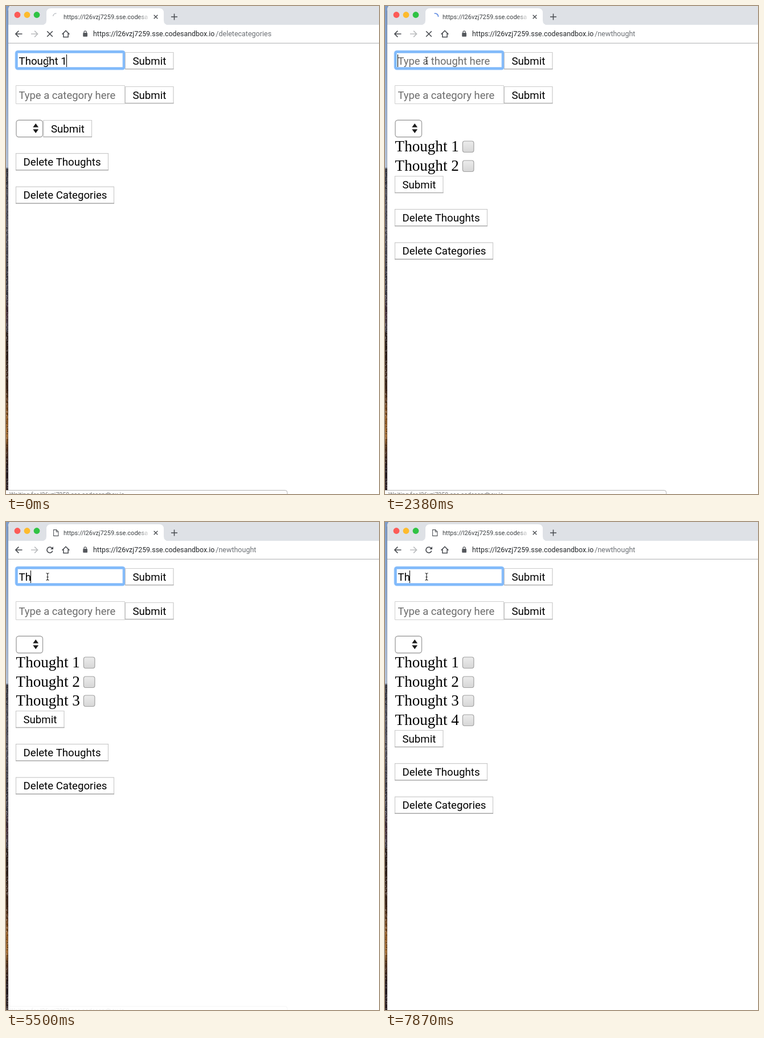
An HTML page with a canvas that plays this animation: 655x856 px, repeating every 8 s.

```html
<!DOCTYPE html>
<html lang="en">
<head>
<meta charset="utf-8">
<title>Thoughts form</title>
<style>
html, body { margin: 0; width: 100%; height: 100%; overflow: hidden; background: #fff; }
canvas { display: block; width: 655px; height: 856px; }
</style>
</head>
<body>
<canvas id="stage" width="655" height="856"></canvas>
<script>
const ctx = document.getElementById('stage').getContext('2d');
const LOOP = 8000, STEPS = 54, ROW = 33.6;
const UI = 'Roboto, "Open Sans", sans-serif';
const SERIF = '"Liberation Serif", "Noto Serif", serif';
const HOST = 'l26vzj7259.sse.codesandbox.io';
const INK = '#484b50', HINT = '#6c6c6c';

// Each round: request sent, page swapped, load done, first key, status bar fading, letters typed per step
const SLOW = [1, 2, 3, 4, 6, 7, 8, 9], FAST = [1, 2, 3, 5, 7, 8, 9];
const rounds = [
  { send: -1, swap: 1, done: 4, type: 5, fade: 6, keys: SLOW },
  { send: 14, swap: 16, done: 21, type: 22, fade: 22, keys: FAST },
  { send: 30, swap: 32, done: 35, type: 36, fade: 37, keys: FAST },
  { send: 44, swap: 47, done: 51, type: 52, fade: 52, keys: FAST }
];

function stateAt(k) {
  const count = rounds.filter(r => r.swap <= k).length;
  const last = rounds[count - 1];
  const full = 'Thought ' + (count + 1);
  let text = full;
  if (last) {
    const i = Math.min(k - last.type, last.keys.length - 1);
    text = i < 0 ? '' : full.slice(0, last.keys[i]);
  }
  return {
    k, count, text,
    loading: rounds.find(r => k >= r.send && k < r.done),
    bar: rounds.some(r => k >= r.send && k < r.fade) ? 1 : rounds.some(r => k === r.fade) ? 0.12 : 0
  };
}

function rect(x, y, w, h, color) {
  ctx.fillStyle = color;
  ctx.fillRect(x, y, w, h);
}

function box(x, y, w, h, r, fill, stroke, width = 1) {
  ctx.beginPath();
  ctx.roundRect(x, y, w, h, r);
  if (fill) { ctx.fillStyle = fill; ctx.fill(); }
  if (stroke) { ctx.strokeStyle = stroke; ctx.lineWidth = width; ctx.stroke(); }
}

function path(d, color, width, fill) {
  const p = new Path2D(d);
  if (fill) { ctx.fillStyle = fill; ctx.fill(p); }
  if (color) { ctx.strokeStyle = color; ctx.lineWidth = width; ctx.stroke(p); }
}

function disc(x, y, r, color) {
  ctx.fillStyle = color;
  ctx.beginPath();
  ctx.arc(x, y, r, 0, Math.PI * 2);
  ctx.fill();
}

function label(text, x, y, size, color = '#000', family = UI) {
  ctx.font = `${size}px ${family}`;
  ctx.fillStyle = color;
  ctx.fillText(text, x, y);
  return ctx.measureText(text).width;
}

function fade(x0, y0, x1, y1, stops) {
  const g = ctx.createLinearGradient(x0, y0, x1, y1);
  stops.forEach(([at, color]) => g.addColorStop(at, color));
  return g;
}

function desktop() {
  rect(0, 0, 6, 856, fade(0, 0, 0, 856, [
    [0, '#7f9dc9'], [0.12, '#8ba7d0'], [0.25, '#a6b9d6'], [0.33, '#b6c3d7'],
    [0.335, '#34353f'], [0.42, '#5c5c68'], [0.52, '#4b4a54'], [0.59, '#41404a'],
    [0.63, '#47303a'], [0.665, '#57545e'], [0.67, '#2c221f'], [0.79, '#4a3021'],
    [0.84, '#95602c'], [0.88, '#a56e32'], [0.91, '#543624'], [0.95, '#261d22'], [1, '#35282a']
  ]));
  // rocky grain below the sky
  let seed = 7;
  const rnd = () => (seed = seed * 16807 % 2147483647) / 2147483647;
  for (let y = 286; y < 856; y += 1 + Math.floor(rnd() * 4)) {
    const tone = rnd() < 0.55 ? '0,0,0' : '190,185,190';
    rect(Math.floor(rnd() * 3), y, 2, 2, `rgba(${tone},${0.1 + rnd() * 0.3})`);
  }
  rect(3, 8, 1, 848, 'rgba(0,0,0,.16)');
}

function spinner(s) {
  const rad = Math.PI / 180, r = s.loading;
  let from, to;
  const waiting = s.k < r.swap;
  if (waiting) {
    to = -85 - (s.k - r.send - 1) * 35;
    from = to - 85;
  } else {
    const n = s.k - r.swap;
    from = -105 + n * 27;
    to = from + Math.min(270, 110 + n * 60);
  }
  ctx.beginPath();
  ctx.arc(88, 18.5, 5.5, from * rad, to * rad);
  ctx.strokeStyle = waiting ? '#a3a8af' : '#5f8ae2';
  ctx.lineWidth = waiting ? 1.2 : 1.6;
  ctx.stroke();
}

function browser(s) {
  box(4, 0, 660, 60, [5, 0, 0, 0], '#dee1e6');
  rect(4, 33, 651, 823, '#fff');
  disc(20, 15.5, 5.4, '#fc5b57');
  disc(37, 15.5, 5.4, '#fdbb2d');
  disc(54, 15.5, 5.4, '#2fc344');

  path('M62 33.5Q71 33.5 71 25V12Q71 4 79 4H269Q277 4 277 12V25Q277 33.5 286 33.5Z', null, 0, '#fff');
  if (s.loading) spinner(s);
  else path('M83.6 13.6H88.5L91.9 17V24.4H83.6ZM88.3 13.8V17.2H91.8', '#55585d', 1.1);
  label('https://' + HOST.slice(0, 21), 101, 22.5, 11.05, fade(101, 0, 251, 0, [
    [0, '#3c4043'], [0.87, '#3c4043'], [1, 'rgba(60,64,67,.1)']
  ]));
  path('M259.7 15.7L266.3 22.3M266.3 15.7L259.7 22.3', '#4c4f54', 1.4);
  path('M290 19H301M295.5 13.5V24.5', INK, 1.5);

  if (s.k === 5) box(124, 37, 60, 24, [12, 0, 0, 12], fade(124, 0, 184, 0, [[0, '#eff1f2'], [1, '#f3f4f5']]));
  path('M28.5 49H17M22.3 43.6L16.9 49L22.3 54.4', INK, 1.6);
  path('M44 49H55.5M50.2 43.6L55.6 49L50.2 54.4', '#babcbe', 1.6);
  if (s.loading) {
    path('M72.2 44.2L81.8 53.8M81.8 44.2L72.2 53.8', INK, 1.6);
  } else {
    ctx.beginPath();
    ctx.arc(77, 49, 5, 0.3, 5.5);
    ctx.strokeStyle = INK;
    ctx.lineWidth = 1.6;
    ctx.stroke();
    path('M83 43V48H78Z', null, 0, INK);
  }
  path('M98.6 49.6L105 43.2L111.4 49.6M100.9 48V54.6H109.1V48', INK, 1.5);
  box(135.2, 47, 7.8, 6.8, 1, '#55585d');
  path('M136.9 47.5V46.2A2.2 2.3 0 0 1 141.3 46.2V47.5', '#55585d', 1.2);
  label('https://' + HOST, 153, 53, 12.4, '#25282b');
  label(s.count ? '/newthought' : '/deletecategories', 368.3, 53, 12.5, '#6b6f74');
  rect(4, 64.6, 651, 1.4, '#c2c4c6');
}

function button(text, x, y, w) {
  box(x, y, w, 29, 0, '#fff', '#cbcbcb', 1.2);
  rect(x - 0.5, y + 28.3, w + 1, 1.5, '#aeaeae');
  label(text, x + 13, y + 21, 18.67);
}

function thoughtInput(text) {
  box(15.5, 77.5, 194.5, 35, 5.5, '#c3dffe');
  box(16.3, 78.3, 192.9, 33.4, 4.5, '#80b9fa');
  box(20, 82, 185.5, 26, 1, '#a3cdfc');
  rect(21, 83, 183.5, 24, '#fff');
  const w = text ? label(text, 22.5, 102.5, 18.67) : 0;
  if (!text) label('Type a thought here', 22.5, 102.5, 18.4, HINT);
  rect(Math.round(22 + w), 85, 1, 22, '#000');
}

function checkbox(x, y) {
  box(x, y, 19.5, 19.5, 3.5, fade(0, y, 0, y + 20, [[0, '#ececec'], [1, '#d6d6d6']]), '#a2a2a2', 1.2);
}

function page(s) {
  thoughtInput(s.text);
  button('Submit', 209.5, 81.5, 84.5);

  box(17.5, 139.5, 191, 32, 0, '#fff', '#cfcfcf');
  label('Type a category here', 22.5, 162.5, 18.4, HINT);
  button('Submit', 209.5, 141.5, 84.5);

  box(18, 200.3, 46.5, 29.4, 4.5, '#fff', '#a3a3a3', 1.4);
  path('M47.3 212.7L52.2 206L57.1 212.7ZM47.3 216.3L52.2 223L57.1 216.3Z', null, 0, '#1c1c1c');

  for (let i = 0; i < s.count; i++) {
    label('Thought ' + (i + 1), 17.6, 255 + i * ROW, 27.1, '#000', SERIF);
    checkbox(136.4, 237 + Math.round(i * ROW));
  }
  const drop = s.count ? Math.round(s.count * ROW + 30.6) : 0;
  if (s.count) button('Submit', 17.5, 200.5 + drop, 84.5);
  else button('Submit', 66, 200.5, 84.5);
  button('Delete Thoughts', 17.5, 258.7 + drop, 162);
  button('Delete Categories', 17.5, 317.2 + drop, 172);
}

function pointer() {
  const beam = 'M70.4 89.7Q73 89.7 73 91.6Q73 89.7 75.6 89.7M73 91V101M70.4 102Q73 102 73 100.2Q73 102 75.6 102M71.5 96.5H74.5';
  path(beam, 'rgba(255,255,255,.7)', 2.6);
  path(beam, '#222', 1.1);
}

function statusBar(alpha) {
  if (!alpha) return;
  ctx.globalAlpha = alpha;
  box(-6, 849.5, 500, 20, 4, '#fdfdfd', '#b4b4b4');
  label(`Waiting for ${HOST}...`, 6, 860.5, 10.6, '#777');
  ctx.globalAlpha = 1;
}

function draw(now) {
  const k = Math.floor((now % LOOP) / LOOP * STEPS + 0.06) % STEPS;
  const s = stateAt(k);
  ctx.clearRect(0, 0, 655, 856);
  desktop();
  browser(s);
  page(s);
  pointer();
  statusBar(s.bar);
}

const start = performance.now();
function tick() {
  draw(performance.now() - start);
  requestAnimationFrame(tick);
}
tick();
</script>
</body>
</html>
```
